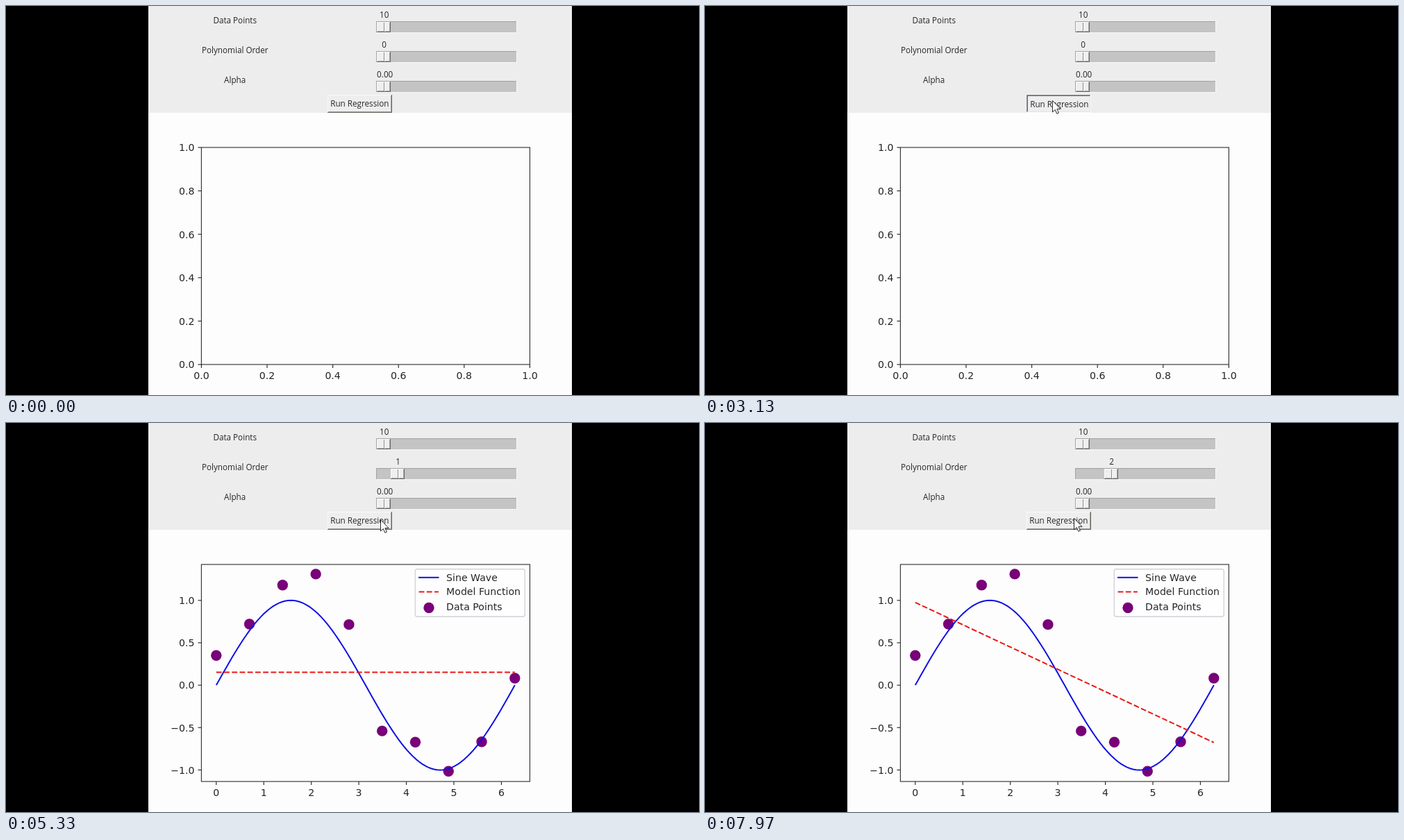
These frames come from a looping animation (998 by 561 pixels, 8 s). An HTML page with a canvas:

```html
<!DOCTYPE html>
<html lang="en">
<head>
<meta charset="utf-8">
<title>Polynomial regression</title>
<style>
html, body { margin: 0; width: 100%; height: 100%; overflow: hidden; background: #000; }
canvas { display: block; width: 998px; height: 561px; }
</style>
</head>
<body>
<canvas id="stage" width="998" height="561"></canvas>
<script>
const ctx = document.getElementById('stage').getContext('2d');
const LOOP = 8000;
const PT = 1.412; // one plot point in pixels
const UI_FONT = '11.7px "Open Sans", "Noto Sans", sans-serif';
const PLOT_FONT = `${10 * PT}px "DejaVu Sans", sans-serif`;
const BOX = { left: 281.4, right: 754.4, top: 204, bottom: 517 };
const DASH = [3.7 * 1.5 * PT, 1.6 * 1.5 * PT];
const INK = '#262626', BLUE = '#1010e4', RED = '#ea1616', PURPLE = '#780078';

// Moments of the session
const ORDER_STEPS = [4700, 7200];
const PRESSES = [[3040, 3200], [5430, 5530]];
const FIRST_FIT = 3230, SECOND_FIT = 5590;

// Pointer stops: time, x, y
const PATH = [
  [2150, 540, 575], [2750, 500, 137], [3290, 500, 137], [3600, 565, 73],
  [5080, 565, 71], [5310, 539, 140], [5670, 539, 140], [6020, 559, 81],
  [6200, 559, 81], [6550, 586, 66], [7610, 586, 66], [7940, 531, 138]
];
const SAMPLES = [0.35, 0.72, 1.18, 1.31, 0.715, -0.54, -0.672, -1.015, -0.668, 0.083];

const px = x => 302.8 + x * 430 / (2 * Math.PI);
const py = y => 378.1 - y * 122.3;

function rect(x, y, w, h, color) {
  ctx.fillStyle = color;
  ctx.fillRect(x, y, w, h);
}

function text(str, x, y, font, align = 'center', color = INK) {
  ctx.font = font;
  ctx.textAlign = align;
  ctx.fillStyle = color;
  ctx.fillText(str, x, y);
}

function line(points, color, width, dash = []) {
  ctx.beginPath();
  points.forEach(([x, y]) => ctx.lineTo(x, y));
  ctx.strokeStyle = color;
  ctx.lineWidth = width;
  ctx.setLineDash(dash);
  ctx.stroke();
  ctx.setLineDash([]);
}

function dot(x, y) {
  ctx.beginPath();
  ctx.arc(x, y, 7.7, 0, Math.PI * 2);
  ctx.fillStyle = PURPLE;
  ctx.fill();
}

function bevel(x, y, w, h, light, dark) {
  rect(x, y, w, 1, light);
  rect(x, y, 1, h, light);
  rect(x, y + h - 1, w, 1, dark);
  rect(x + w - 1, y, 1, h, dark);
}

function slider(label, value, y, step = 0, shift = 0) {
  text(label, 329.7, y + 3, UI_FONT);
  const x = 534 + Math.round(step * 20.3);
  text(value, x + 10.7 + shift, y - 5, UI_FONT);
  rect(533, y, 203, 17, '#c4c4c4');
  bevel(533, y, 203, 17, '#a2a2a0', '#f8f8f8');
  rect(x, y + 1, 20, 15, '#efefef');
  bevel(x, y + 1, 20, 15, '#fbfbfb', '#696969');
  rect(x + 18, y + 2, 1, 13, '#a8a8a8');
  rect(x + 1, y + 14, 18, 1, '#a8a8a8');
  rect(x + 10, y + 2, 1, 13, '#8a8a8a');
  rect(x + 11, y + 2, 1, 13, '#fbfbfb');
}

function button(pressed) {
  rect(463, 128, 93, 26, '#eeeeee');
  if (pressed) {
    bevel(463, 128, 93, 26, '#8c8c98', '#fafafa');
    bevel(464, 129, 91, 24, '#6c6c78', '#e4e4e4');
  } else {
    bevel(463, 128, 93, 26, '#fafafa', '#696660');
    rect(554, 129, 1, 24, '#a5a29c');
    rect(464, 152, 91, 1, '#a5a29c');
  }
  const d = pressed ? 1 : 0;
  text('Run Regression', 509.3 + d, 145 + d, UI_FONT);
}

function panel(t) {
  rect(205, 0, 610, 154, '#ededed');
  const order = ORDER_STEPS.filter(s => t >= s).length;
  slider('Data Points', '10', 22);
  slider('Polynomial Order', String(order), 65, order);
  slider('Alpha', '0.00', 108, 0, 1);
  button(PRESSES.some(([from, to]) => t >= from && t < to));
}

function xTick(label, x) {
  line([[x, BOX.bottom], [x, BOX.bottom + 3.5 * PT]], INK, 0.8 * PT);
  text(label, x, 537.5, PLOT_FONT);
}

function yTick(label, y) {
  line([[BOX.left, y], [BOX.left - 3.5 * PT, y]], INK, 0.8 * PT);
  text(label, BOX.left - 7 * PT, y + 5.3, PLOT_FONT, 'right');
}

function frame() {
  ctx.strokeStyle = '#303030';
  ctx.lineWidth = 0.8 * PT;
  ctx.strokeRect(BOX.left, BOX.top, BOX.right - BOX.left, BOX.bottom - BOX.top);
}

function emptyAxes() {
  for (let i = 0; i <= 5; i++) {
    const label = (i / 5).toFixed(1);
    xTick(label, BOX.left + i * 94.6);
    yTick(label, BOX.bottom - i * 62.6);
  }
  frame();
}

function legend() {
  ctx.beginPath();
  ctx.roundRect(589.3, 210.8, 158, 68.4, 3);
  ctx.fillStyle = 'rgba(255,255,255,.8)';
  ctx.fill();
  ctx.strokeStyle = '#d2d2da';
  ctx.lineWidth = PT;
  ctx.stroke();
  line([[594, 222.8], [623.5, 222.8]], BLUE, 2);
  line([[594.6, 243.6], [622.8, 243.6]], RED, 2, DASH);
  dot(609, 266.5);
  ['Sine Wave', 'Model Function', 'Data Points'].forEach((name, i) =>
    text(name, 634.1, [228, 248.3, 269.5][i], PLOT_FONT, 'left'));
}

function fitted(from, to) {
  for (let i = 0; i <= 6; i++) xTick(String(i), px(i));
  for (let v = -1; v <= 1; v += 0.5) {
    yTick((v < 0 ? '\u2212' : '') + Math.abs(v).toFixed(1), py(v));
  }
  const end = 2 * Math.PI;
  SAMPLES.forEach((v, i) => dot(px(i * end / 9), py(v)));
  const wave = Array.from({ length: 101 }, (_, i) => {
    const x = i * end / 100;
    return [px(x), py(Math.sin(x))];
  });
  line(wave, BLUE, 2);
  line([[px(0), from], [px(end), to]], RED, 2, DASH);
  frame();
  legend();
}

function pointer(t) {
  if (t < PATH[0][0]) return;
  let [, x, y] = PATH[PATH.length - 1];
  const i = PATH.findIndex(p => p[0] > t);
  if (i > 0) {
    const [t0, x0, y0] = PATH[i - 1], [t1, x1, y1] = PATH[i];
    const u = (t - t0) / (t1 - t0), e = u * u * (3 - 2 * u);
    x = x0 + (x1 - x0) * e;
    y = y0 + (y1 - y0) * e;
  }
  ctx.save();
  ctx.translate(Math.round(x) + 0.5, Math.round(y) - 0.5);
  ctx.beginPath();
  [[0, 0], [0, 16.5], [3.8, 13], [6.3, 18.8], [8.9, 17.7], [6.4, 12.1], [11.6, 12.1]]
    .forEach(([a, b]) => ctx.lineTo(a, b));
  ctx.closePath();
  ctx.fillStyle = '#fff';
  ctx.fill();
  ctx.strokeStyle = '#2c2c2c';
  ctx.lineWidth = 1;
  ctx.stroke();
  ctx.restore();
}

function draw(t) {
  rect(0, 0, 998, 561, '#000');
  rect(205, 154, 610, 407, '#fdfdfd');
  panel(t);
  if (t < FIRST_FIT) emptyAxes();
  else if (t < SECOND_FIT) fitted(359.5, 359.5);
  else fitted(258.8, 460.8);
  pointer(t);
}

let start;
function tick(now) {
  if (start === undefined) start = now;
  draw((now - start) % LOOP);
  requestAnimationFrame(tick);
}
requestAnimationFrame(tick);
</script>
</body>
</html>
```
